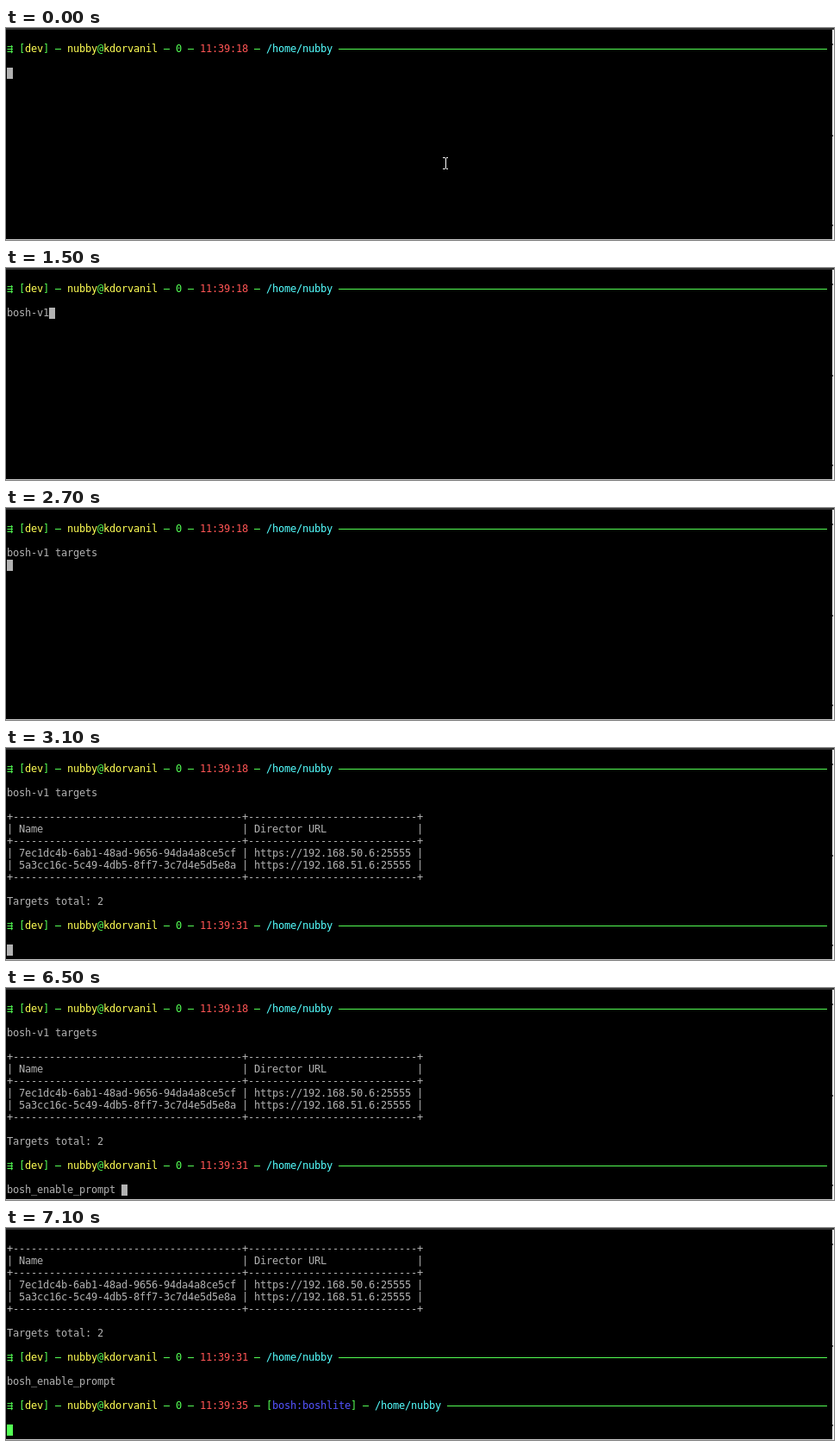
An HTML page with a canvas that plays this animation: 961x246 px, repeating every 8 s.

```html
<!DOCTYPE html>
<html lang="en">
<head>
<meta charset="utf-8">
<title>Terminal session</title>
<style>
  html, body { margin: 0; width: 100%; height: 100%; overflow: hidden; background: #000; }
  canvas { display: block; }
</style>
</head>
<body>
<canvas id="stage" width="961" height="246"></canvas>
<script>
const ctx = document.getElementById('stage').getContext('2d');
const LOOP = 8000, COLS = 136, CELL_W = 7, CELL_H = 14, LEFT = 1, TOP = 4;
const GREY = '#b2b2b2', GREEN = '#54ff54', YELLOW = '#ffff54',
      RED = '#ff5454', CYAN = '#54ffff', BLUE = '#5454ff';
const USER = 'nubby', HOST = 'kdorvanil';

// A line is a list of [text, colour] runs.
const plain = text => [[text, GREY]];

function prompt(time, target) {
  const runs = [
    ['⇶ [', GREEN], ['dev', YELLOW], ['] ─ ', GREEN],
    [USER, YELLOW], ['@', GREEN], [HOST, YELLOW],
    [' ─ 0 ─ ', GREEN], [time, RED], [' ─ ', GREEN]
  ];
  if (target) runs.push(['[', GREEN], [target, BLUE], ['] ─ ', GREEN]);
  runs.push(['/home/' + USER + ' ', CYAN]);
  const used = runs.reduce((n, [text]) => n + text.length, 0);
  runs.push(['─'.repeat(COLS - used), GREEN]);
  return runs;
}

const rule = plain('+' + '-'.repeat(38) + '+' + '-'.repeat(28) + '+');
const row = (name, url) => plain('| ' + name.padEnd(36) + ' | ' + url.padEnd(26) + ' |');

const output = [
  [], rule,
  row('Name', 'Director URL'),
  rule,
  row('7ec1dc4b-6ab1-48ad-9656-94da4a8ce5cf', 'https://192.168.50.6:25555'),
  row('5a3cc16c-5c49-4db5-8ff7-3c7d4e5d5e8a', 'https://192.168.51.6:25555'),
  rule, [],
  plain('Targets total: 2'), [],
  prompt('11:39:31'), []
];

// Times at which the typed text grows to the given length.
const CMD_1 = 'bosh-v1 targets';
const KEYS_1 = [[500, 1], [600, 2], [700, 3], [800, 4], [1200, 6], [1500, 7], [1700, 8],
  [1900, 9], [2000, 10], [2100, 11], [2300, 13], [2400, 14], [2600, 15]];
const CMD_2 = 'bosh_enable_prompt ';
const KEYS_2 = [[5700, 1], [5800, 3], [5900, 4], [6200, 5], [6300, 6], [6500, 19]];
const ENTER_1 = 2700, RESULT_1 = 3100, ENTER_2 = 7000, RESULT_2 = 7100;

function typed(command, keys, t) {
  let count = 0;
  for (const [at, length] of keys) if (t >= at) count = length;
  return command.slice(0, count);
}

function screen(t) {
  const first = typed(CMD_1, KEYS_1, t);
  const lines = [[], prompt('11:39:18'), [], plain(first)];
  let col = first.length, scroll = 0;
  if (t >= ENTER_1) {
    lines.push([]);
    col = 0;
  }
  if (t >= RESULT_1) {
    const second = typed(CMD_2, KEYS_2, t);
    lines.pop();
    lines.push(...output, plain(second));
    col = second.length;
  }
  if (t >= ENTER_2) {
    lines.push([]);
    col = 0;
    scroll = 1;
  }
  if (t >= RESULT_2) {
    lines.push(prompt('11:39:35', 'bosh:boshlite'), [], []);
    scroll = 4;
  }
  return { lines, col, scroll, caret: t >= RESULT_2 ? GREEN : GREY };
}

function box(x, y, w, h, colour) {
  ctx.fillStyle = colour;
  ctx.fillRect(x, y, w, h);
}

function drawLine(runs, y) {
  let x = LEFT;
  for (const [text, colour] of runs) {
    ctx.fillStyle = colour;
    for (const ch of text) {
      if (ch === '─') ctx.fillRect(x, y + 6, CELL_W, 1);
      else if (ch !== ' ') ctx.fillText(ch, x, y + 10);
      x += CELL_W;
    }
  }
}

// Window border with the edge of the scroll bar on the right.
function drawFrame(scrolled) {
  box(0, 0, 961, 2, '#333');
  box(0, 245, 961, 1, '#c8c8c8');
  box(959, 2, 2, 244, '#f0f0f0');
  for (const y of [18, scrolled ? 136 : 124, 228]) box(959, y, 1, 2, '#555');
}

function drawPointer() {
  box(510, 151, 1, 12, '#fff');
  for (const y of [150, 163]) {
    box(507, y, 3, 1, '#fff');
    box(511, y, 2, 1, '#fff');
  }
}

function draw(t) {
  const { lines, col, scroll, caret } = screen(t);
  box(0, 0, 961, 246, '#000');
  drawFrame(scroll > 0);
  ctx.font = '12px "DejaVu Sans Mono", monospace';
  ctx.textBaseline = 'alphabetic';
  lines.slice(scroll).forEach((runs, i) => drawLine(runs, TOP + i * CELL_H));
  const caretRow = lines.length - 1 - scroll;
  box(LEFT + col * CELL_W, TOP + caretRow * CELL_H, CELL_W, CELL_H - 1, caret);
  if (t < KEYS_1[0][0]) drawPointer();
}

const start = performance.now();
function tick() {
  draw((performance.now() - start) % LOOP);
  requestAnimationFrame(tick);
}
tick();
</script>
</body>
</html>
```
